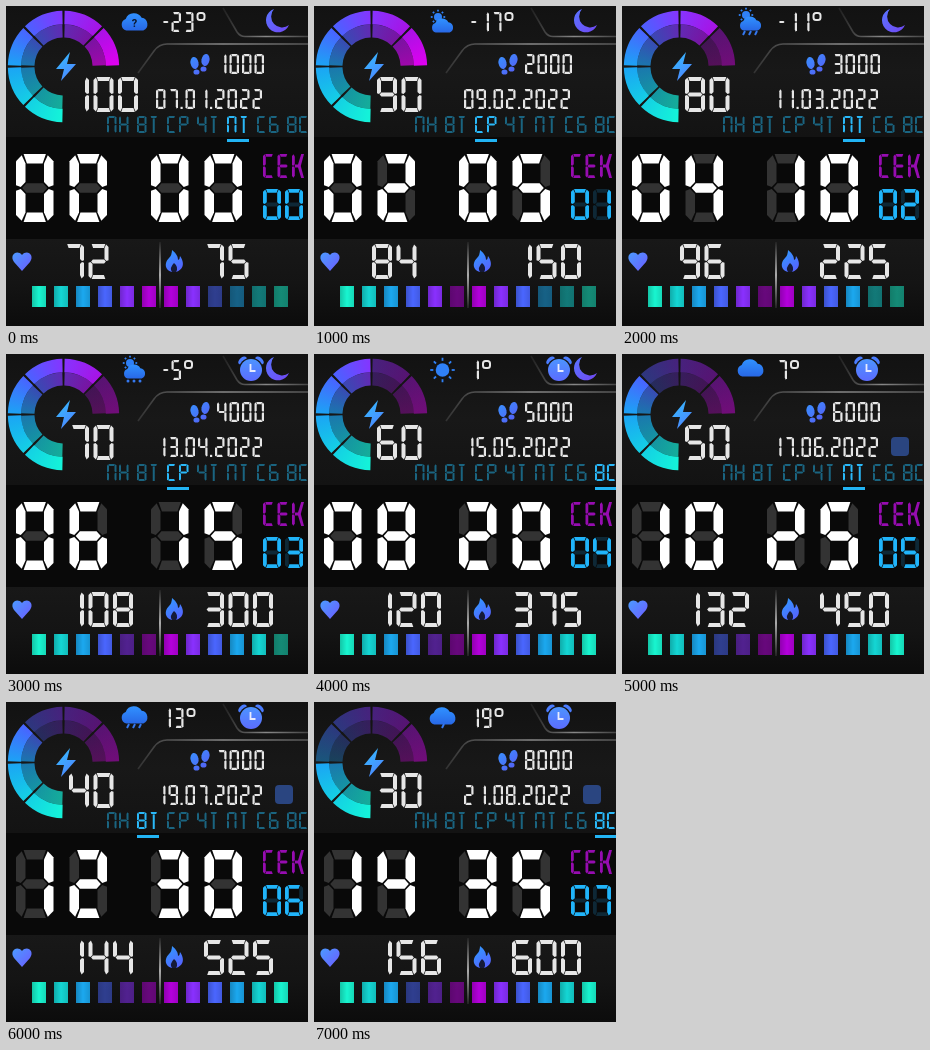
These frames come from a looping animation (302 by 320 pixels, 8000 ms). An HTML page with a canvas:

```html
<!DOCTYPE html>
<html>
<head>
<meta charset="utf-8">
<style>
html, body { margin: 0; width: 100%; height: 100%; overflow: hidden; background: #111; }
canvas { display: block; }
</style>
</head>
<body>
<canvas id="face" width="302" height="320"></canvas>
<script>
const ctx = document.getElementById('face').getContext('2d');
const COLORS = ['#18f5d0', '#14d6d4', '#1ba8ef', '#4a66ff', '#8a30ff', '#b400dc'];
const WHITE = '#e6e6e6';

// Lit segments per glyph; t = centre stem, k = diagonal arms
const GLYPHS = {
  0: 'abcdef', 1: 'bc', 2: 'abged', 3: 'abgcd', 4: 'fgbc', 5: 'afgcd', 6: 'afgedc',
  7: 'abc', 8: 'abcdefg', 9: 'abcdfg', '-': 'g',
  'П': 'abcef', 'Н': 'bcefg', 'В': 'abcdefg', 'Т': 'at', 'С': 'adef', 'Р': 'abefg',
  'Ч': 'bcfg', 'Б': 'acdefg', 'Е': 'adefg', 'К': 'efk'
};

const pad = n => String(n).padStart(2, '0');

function poly(points, color) {
  ctx.fillStyle = color;
  ctx.beginPath();
  points.forEach(([x, y]) => ctx.lineTo(x, y));
  ctx.fill();
}

function disc(x, y, rx, ry = rx, tilt = 0) {
  ctx.beginPath();
  ctx.ellipse(x, y, rx, ry, tilt, 0, Math.PI * 2);
  ctx.fill();
}

function line(x1, y1, x2, y2, width, color) {
  ctx.strokeStyle = color;
  ctx.lineWidth = width;
  ctx.beginPath();
  ctx.moveTo(x1, y1);
  ctx.lineTo(x2, y2);
  ctx.stroke();
}

function gradient(x1, y1, x2, y2, ...stops) {
  const g = ctx.createLinearGradient(x1, y1, x2, y2);
  stops.forEach((c, i) => g.addColorStop(i / (stops.length - 1), c));
  return g;
}

function shape(d, fill) {
  ctx.fillStyle = fill;
  ctx.fill(new Path2D(d));
}

function glyph(char, x, y, w, h, t, color, off) {
  const m = h / 2, c = w / 2, s = t / 2;
  const top = [[.8 * t, 0], [w - .8 * t, 0], [w - 1.15 * t, t], [1.15 * t, t]];
  const side = [[0, .75 * t], [.6 * t, .12 * t], [t, t], [t, m - .62 * t], [.5 * t, m - .1 * t], [0, m - .3 * t]];
  const flip = (p, fx, fy) => p.map(([a, b]) => [fx ? w - a : a, fy ? h - b : b]);
  const parts = {
    a: top, d: flip(top, 0, 1), f: side, b: flip(side, 1, 0), e: flip(side, 0, 1), c: flip(side, 1, 1),
    g: [[.65 * t, m], [1.1 * t, m - s], [w - 1.1 * t, m - s], [w - .65 * t, m], [w - 1.1 * t, m + s], [1.1 * t, m + s]],
    t: [[c - s, t * 1.2], [c + s, t * 1.2], [c + s, h], [c - s, h]],
    k: [[t, m - s], [c, m - s], [w - t, 0], [w, 0], [c + t, m], [w, h], [w - t, h], [c, m + s], [t, m + s]]
  };
  const lit = GLYPHS[char];
  for (const name of off ? 'abcdefg' : lit) {
    const on = lit.includes(name);
    poly(parts[name].map(([a, b]) => [x + a, y + b]), on ? color : off);
  }
}

// Fixed-pitch segment text; a dot takes a narrow cell
function write(text, x, y, w, h, t, step, color = WHITE, off) {
  for (const char of String(text)) {
    if (char === '.') {
      ctx.fillStyle = color;
      ctx.fillRect(x - .5, y + h - t, t, t);
      x += 4.5;
    } else {
      glyph(char, x, y, w, h, t, color, off);
      x += step;
    }
  }
}

const writeSmall = (text, x, y) => write(text, x, y, 9.5, 20, 2.2, 12.5);
const writeLarge = (text, x, y) => write(text, x, y, 20, 35, 4, 24.5);

function background() {
  ctx.fillStyle = gradient(0, 0, 0, 131, '#121212', '#181818', '#131313');
  ctx.fillRect(0, 0, 302, 131);
  ctx.fillStyle = '#090909';
  ctx.fillRect(0, 131, 302, 102);
  ctx.fillStyle = gradient(0, 233, 0, 320, '#181818', '#141414', '#0c0c0c');
  ctx.fillRect(0, 233, 302, 87);
  ctx.lineWidth = 1.6;
  ctx.strokeStyle = gradient(218, 0, 302, 0, '#222', '#888', '#444');
  ctx.stroke(new Path2D('M217 2L231 26Q234 30.5 239 30.5H302'));
  ctx.strokeStyle = gradient(132, 0, 302, 0, '#333', '#888', '#555');
  ctx.stroke(new Path2D('M132 67L148 45Q153 38 161 38H302'));
  line(154, 236, 154, 302, 2, gradient(0, 236, 0, 302, '#222', '#aaa', '#222'));
}

function ring(lit) {
  const x = 57.5, y = 60.5, size = Math.PI / 4;
  const g = ctx.createConicGradient(Math.PI / 2, x, y);
  ['#14f5d8', '#14d0e4', '#1ba4f5', '#4a62ff', '#8634ff', '#a812e4', '#e000f0']
    .forEach((c, i) => g.addColorStop(i / 8, c));
  ctx.strokeStyle = g;
  ctx.lineWidth = 13.3;
  for (let i = 0; i < 6; i++) {
    const start = Math.PI / 2 + i * size;
    for (const [radius, alpha] of [[49, 1], [35.7, .68]]) {
      ctx.globalAlpha = alpha * (i < lit ? 1 : .45);
      ctx.beginPath();
      ctx.arc(x, y, radius, start + 1 / radius, start + size - 1 / radius);
      ctx.stroke();
    }
  }
  ctx.globalAlpha = 1;
  shape('M64 46L50 63H58L55 75L70 58H61Z', gradient(50, 50, 70, 72, '#34bcff', '#5080ff'));
}

function sun(x, y, r) {
  disc(x, y, r);
  for (let i = 0; i < 8; i++) {
    const c = Math.cos(i * Math.PI / 4), s = Math.sin(i * Math.PI / 4);
    line(x + c * r * 1.35, y + s * r * 1.35, x + c * r * 1.8, y + s * r * 1.8, 1.8, ctx.fillStyle);
  }
}

function cloud(y, scale) {
  ctx.save();
  ctx.translate(128.5, y);
  ctx.scale(scale, scale);
  shape('M-7.5 15a5.5 5.5 0 0 1 -.5 -10.5a8 8 0 0 1 14.5 -1a6 6 0 0 1 1.5 11.5Z', gradient(0, 0, 0, 15, '#3090ff', '#2868e6'));
  ctx.restore();
}

function drops(y, xs, snow) {
  ctx.fillStyle = '#3478f0';
  for (const x of xs) snow ? disc(x, y + 2, 1.5) : line(x + 1, y, x - 1, y + 4, 2, '#3478f0');
}

function weather(n) {
  ctx.fillStyle = '#2f80f6';
  if (n === 4) return sun(128.5, 16, 6.8);
  const mixed = n > 0 && n < 4;
  if (mixed) sun(124, n === 1 ? 11 : 9, 4);
  cloud([8, 13, 11, 11, 0, 6, 5, 6][n], mixed ? .9 : 1.1);
  if (n === 0) {
    ctx.fillStyle = '#0c1830';
    ctx.font = 'bold 11px Roboto, sans-serif';
    ctx.textAlign = 'center';
    ctx.fillText('?', 128.5, 21);
  }
  if (n === 2) drops(25, [122, 128, 134]);
  if (n === 3) drops(25, [122, 128, 134], true);
  if (n === 6) drops(22, [122, 128, 134]);
  if (n === 7) drops(22, [129]);
}

function alarm() {
  ctx.fillStyle = '#4a7cff';
  disc(236.5, 6.5, 5, 3, -.7);
  disc(253.5, 6.5, 5, 3, .7);
  ctx.fillStyle = '#141414';
  disc(245, 16, 12.3);
  ctx.fillStyle = gradient(0, 5, 0, 27, '#4c94ff', '#5c6cff');
  disc(245, 16, 11);
  ctx.strokeStyle = '#e8ecff';
  ctx.lineWidth = 1.8;
  ctx.stroke(new Path2D('M244.5 10V17H249.5'));
}

function icons(n) {
  weather(n);
  if (n < 5) shape('M268 3A12 12 0 1 0 283 19A11 11 0 0 1 268 3Z', gradient(260, 4, 283, 26, '#5a74ff', '#7048f4'));
  if (n > 2) alarm();
  if (n > 4) {
    ctx.fillStyle = '#2a4580';
    ctx.beginPath();
    ctx.roundRect(269, 83, 18, 19, 4);
    ctx.fill();
  }
  ctx.fillStyle = gradient(184, 48, 204, 69, '#3694ff', '#5a58f4');
  disc(188.5, 57, 4, 6, -.2);
  disc(190.5, 66, 3, 2.6);
  disc(199.5, 54, 4, 6, .2);
  disc(197.5, 63, 3, 2.6);
  shape('M16 265L8 256C3 249 11 243 16 249C21 243 29 249 24 256Z', gradient(6, 246, 26, 264, '#4a9cff', '#6c5cff'));
  shape('M166 244C171 248 172 251 172 254Q174 253 174 250C181 260 174 266 168 266C160 266 157 258 163 252Q166 249 166 244Z',
    gradient(160, 245, 176, 266, '#2f9cff', '#5a5cff'));
  shape('M168 257Q173 261 170 266H166Q163 262 168 257Z', '#151a38');
}

function bars(left, right) {
  for (let i = 0; i < 12; i++) {
    const x = 26 + i * 22;
    ctx.globalAlpha = (i < 6 ? i < left : i - 6 < right) ? 1 : .53;
    ctx.fillStyle = COLORS[i < 6 ? i : 11 - i];
    ctx.fillRect(x, 280, 14, 21);
    ctx.fillStyle = gradient(x, 0, x + 14, 0, 'rgba(0,0,0,.2)', 'rgba(0,0,0,0)', 'rgba(0,0,0,.12)');
    ctx.fillRect(x, 280, 14, 21);
  }
  ctx.globalAlpha = 1;
}

function weekdays(today) {
  'ПН ВТ СР ЧТ ПТ СБ ВС'.split(' ').forEach((name, i) => {
    const x = 101 + i * 30, active = i === today;
    write(name, x, 110, 9.5, 17, 2, 12, active ? '#2ab8f8' : '#1a6480');
    if (active) {
      ctx.fillStyle = '#22b4f4';
      ctx.fillRect(x, 133, 22, 3);
    }
  });
}

function temperature(value) {
  let x = 155.5;
  if (value < 0) {
    glyph('-', x, 6, 8.5, 20, 2.2, WHITE);
    x += 10;
  }
  const digits = String(Math.abs(value));
  writeSmall(digits, x, 6);
  x += digits.length * 12.5;
  ctx.strokeStyle = WHITE;
  ctx.lineWidth = 2;
  ctx.beginPath();
  ctx.roundRect(x + 1, 7, 7, 7, 2.5);
  ctx.stroke();
}

function draw() {
  const n = Math.floor(performance.now() / 1000) % 8;
  const date = new Date(2022, n, 7 + 2 * n);
  const battery = 100 - 10 * n;

  background();
  ring(Math.ceil(battery * 6 / 100));
  icons(n);
  temperature(6 * n - 23);
  writeLarge(battery, 63, 71);
  writeSmall(1000 * (n + 1), 211, 48);
  writeSmall(`${pad(date.getDate())}.${pad(n + 1)}.2022`, 150, 83);
  weekdays((date.getDay() + 6) % 7);

  write(pad(2 * n), 10, 148, 37.5, 68, 9.5, 53.5, '#fff', '#333');
  write(pad(5 * n), 145, 148, 37.5, 68, 9.5, 53.5, '#fff', '#333');
  write('СЕК', 257, 148, 12, 24, 2.8, 14.5, '#960cb0');
  write(pad(n), 257, 183, 18, 31, 3.8, 22, '#20b4fa', '#0e2836');

  writeLarge(72 + 12 * n, 58, 238);
  writeLarge(75 * (n + 1), 198, 238);
  bars(6 - Math.ceil(n * .42), Math.min(6, n + 2));
  requestAnimationFrame(draw);
}
draw();
</script>
</body>
</html>
```
